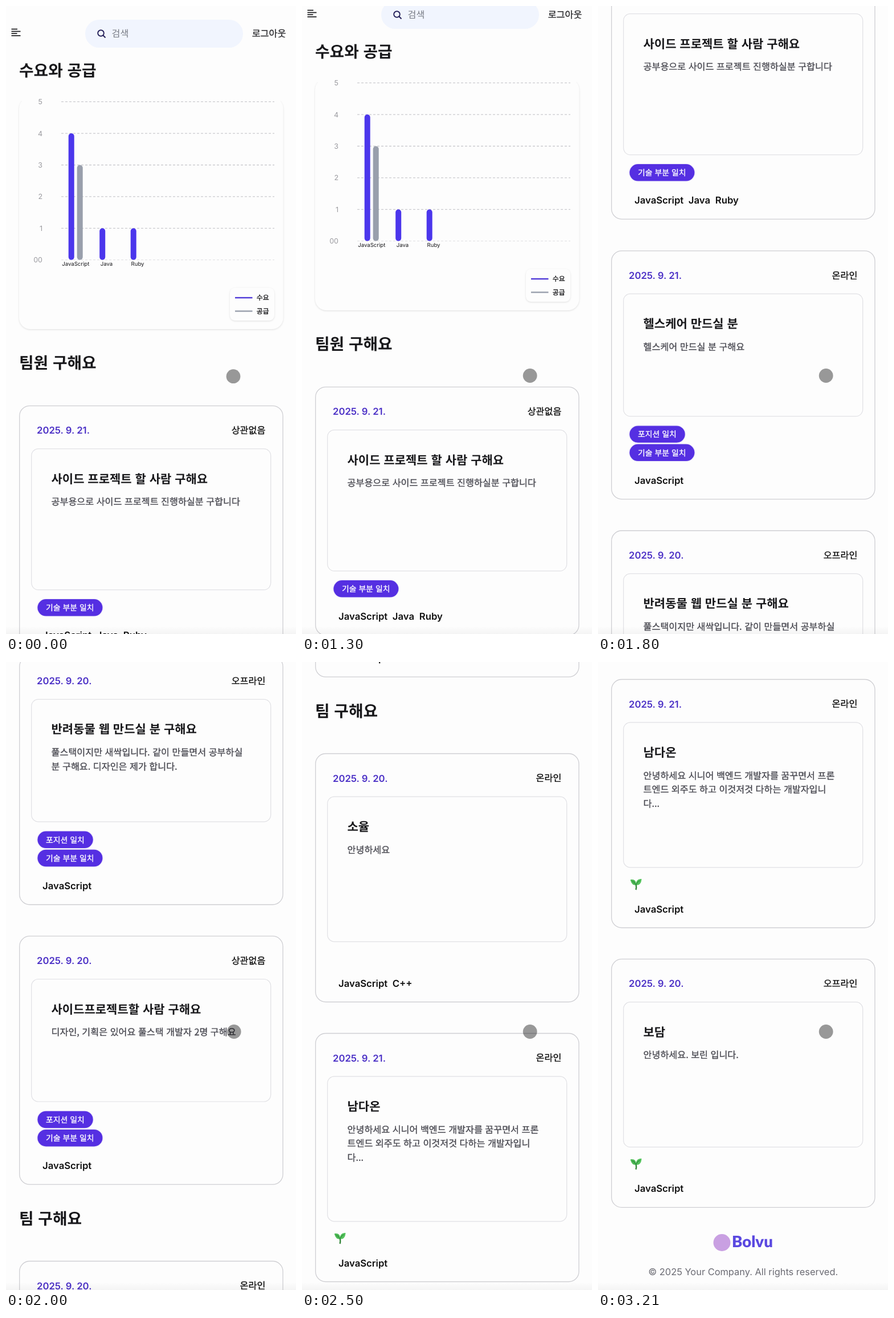
An HTML page that plays this animation: 509x1100 px, repeating every 3320 ms.

```html
<!DOCTYPE html>
<html lang="ko">
<head>
<meta charset="utf-8">
<style>
  html, body { margin: 0; width: 100%; height: 100%; overflow: hidden; background: #fdfdfd; }
  svg { display: block; width: 100%; height: 100%; }
  text { font-family: Inter, "Noto Sans CJK KR", "Noto Sans CJK", sans-serif; text-rendering: geometricPrecision; }
  .ko { font-family: "Noto Sans CJK KR", "Noto Sans CJK", sans-serif; }
  .medium { stroke: currentColor; stroke-width: .32px; }
  .logo { font-family: Lato, sans-serif; }
  .shadow { filter: drop-shadow(0 1.5px 1.5px rgba(0, 0, 0, .12)); }
</style>
</head>
<body>
<svg viewBox="0 0 509 1100">
  <defs>
    <linearGradient id="fade" x2="0" y2="1">
      <stop stop-color="#000" stop-opacity="0"/>
      <stop offset="1" stop-color="#000" stop-opacity=".035"/>
    </linearGradient>
  </defs>
  <g id="page"></g>
  <rect y="1086" width="509" height="14" fill="url(#fade)"/>
  <circle id="pointer" r="12.4" fill="#000" fill-opacity=".4"/>
</svg>
<script>
const LOOP = 3320;
const INK = '#18181b', BLUE = '#4b36ec', GRAY = '#999fac';
const BODY = 16.22, LATIN = 16.7;
const page = document.getElementById('page');
const pointer = document.getElementById('pointer');

const rect = (x, y, w, h, r, attrs) =>
  `<rect x="${x}" y="${y}" width="${w}" height="${h}" rx="${r}" ${attrs}/>`;
const line = (x1, x2, y, attrs) => `<path d="M${x1} ${y}H${x2}" fill="none" ${attrs}/>`;

// Text placed by its vertical centre; Hangul strings get the Korean face.
function text(x, cy, size, weight, fill, str, anchor = 'start', extra = '') {
  const ko = /[가-힣]/.test(str);
  const cls = `${ko ? 'ko' : ''} ${ko && weight === 500 ? 'medium' : ''} ${extra}`;
  return `<text x="${x}" y="${cy + size * (ko ? .375 : .363)}" font-size="${size}" font-weight="${weight}"
    fill="${fill}" color="${fill}" text-anchor="${anchor}" class="${cls}">${str}</text>`;
}
const heading = (cy, str) => text(23, cy, 27.8, 700, INK, str);

function header() {
  return [[20, 40.5], [25.5, 44.5], [19.5, 48.2], [25.5, 52]]
      .map(([end, y]) => line(9.5, end, y, `stroke="${INK}" stroke-width="1.7"`)).join('') +
    rect(139, 24, 277, 49, 24.5, 'fill="#f1f5fe"') +
    `<path d="M170.5 51.5L174.5 55.5" stroke="#25215a" stroke-width="1.9"/>
     <circle cx="166.5" cy="47.5" r="5.3" fill="none" stroke="#25215a" stroke-width="1.9"/>` +
    text(185.5, 48, BODY, 400, '#777b84', '검색') +
    text(491.3, 48, BODY, 500, '#27272a', '로그아웃', 'end');
}

function chart() {
  const base = 444.7, unit = 55.4;
  let out = rect(23, 160, 463.5, 406, 20, 'fill="#fdfdfd" class="shadow"') +
    rect(15, 150, 480, 16, 0, 'fill="#fdfdfd"');
  for (let v = 0; v <= 5; v++) {
    const y = base - v * unit;
    out += line(97, 471, y, `stroke="${v ? '#cbcbcf' : '#e4e4e6'}" stroke-width="1.3" stroke-dasharray="4 3"`) +
      text(64, y, 12.5, 400, '#9a9a9f', v || '00', 'end');
  }
  const bar = (x, v, fill) => rect(x, base - v * unit, 10, v * unit, 5, `fill="${fill}"`);
  out += bar(109.7, 4, BLUE) + bar(124.7, 3, GRAY) + bar(164.2, 1, BLUE) + bar(218.7, 1, BLUE);
  [['JavaScript', 122.3], ['Java', 176.5], ['Ruby', 231]].forEach(([name, x]) =>
    out += text(x, 452, 9.6, 400, INK, name, 'middle'));
  out += rect(393, 493.5, 78, 57.5, 9, 'fill="#fdfdfd" class="shadow"');
  [['수요', 511, '#4f39d8'], ['공급', 534.5, GRAY]].forEach(([name, y, color]) =>
    out += line(402, 432.5, y, `stroke="${color}" stroke-width="2.4"`) +
      text(439.7, y, 11.9, 500, INK, name));
  return out;
}

const sprout = (x, y) => `<g transform="translate(${x} ${y})">
  <path d="M0 10.5C1.5 6 .5 3 0 0" fill="none" stroke="#35863b" stroke-width="2.4"/>
  <path d="M.3 2C-5 3.500-8-1-9.700-7C-4-8.500 1-6 .3 2Z" fill="#4dbb55"/>
  <path d="M.3 2C-.5-5 4-9 10-8.500C9.500-1 6 3.500 .3 2Z" fill="#54c45c"/>
  <path d="M-6.500-4.500Q-2-3 .3 2Q2-3 7-5.500" fill="none" stroke="#2f8a3c" stroke-width="1.2"/>
</g>`;

function badge(y, str) {
  const width = str.length > 6 ? 114 : 97.3;
  return rect(55.4, y + .3, width, 29.4, 14.7,
      'fill="#552fe2" stroke="#e0dbf8" stroke-width="1.6" paint-order="stroke"') +
    text(70, y + 15, 13.9, 500, '#fff', str);
}

function card({ y, date, place, boxHeight, title, lines, badges = [], plant, tags }) {
  const tagX = [64, 158.8, 205.8];
  return rect(23.7, y, 462.3, 435, 18, 'fill="none" stroke="#cfcfd3" stroke-width="1.3"') +
    text(54, y + 43, LATIN, 600, '#4b30c6', date) +
    text(455.3, y + 42.7, BODY, 500, '#111', place, 'end') +
    rect(44.7, y + 75.3, 420, boxHeight, 12, 'fill="none" stroke="#e1e1e5" stroke-width="1.2"') +
    text(79.5, y + 127.5, 21, 700, INK, title) +
    lines.map((str, i) => text(79.6, y + 168 + i * 24.8, BODY, 500, '#484850', str)).join('') +
    badges.map((str, i) => badge(y + 338.5 - 32.2 * (badges.length - 1 - i), str)).join('') +
    (plant ? sprout(66.5, y + 358) : '') +
    tags.map((str, i) => text(tagX[i], y + 402, LATIN, 600, '#111', str)).join('');
}

const both = ['포지션 일치', '기술 부분 일치'], js = ['JavaScript'];
const cards = [
  { y: 700.3, date: '2025. 9. 21.', place: '상관없음', boxHeight: 247, title: '사이드 프로젝트 할 사람 구해요',
    lines: ['공부용으로 사이드 프로젝트 진행하실분 구합니다'], badges: ['기술 부분 일치'],
    tags: ['JavaScript', 'Java', 'Ruby'] },
  { y: 1190.8, date: '2025. 9. 21.', place: '온라인', boxHeight: 214.5, title: '헬스케어 만드실 분',
    lines: ['헬스케어 만드실 분 구해요'], badges: both, tags: js },
  { y: 1681, date: '2025. 9. 20.', place: '오프라인', boxHeight: 214.5, title: '반려동물 웹 만드실 분 구해요',
    lines: ['풀스택이지만 새싹입니다. 같이 만들면서 공부하실', '분 구해요. 디자인은 제가 합니다.'],
    badges: both, tags: js },
  { y: 2171.2, date: '2025. 9. 20.', place: '상관없음', boxHeight: 214.5, title: '사이드프로젝트할 사람 구해요',
    lines: ['디자인, 기획은 있어요 풀스택 개발자 2명 구해요'], badges: both, tags: js },
  { y: 2740.5, date: '2025. 9. 20.', place: '온라인', boxHeight: 254, title: '소율',
    lines: ['안녕하세요'], tags: ['JavaScript', 'C++'] },
  { y: 3230.5, date: '2025. 9. 21.', place: '온라인', boxHeight: 254, title: '남다온',
    lines: ['안녕하세요 시니어 백엔드 개발자를 꿈꾸면서 프론', '트엔드 외주도 하고 이것저것 다하는 개발자입니', '다...'],
    plant: true, tags: js },
  { y: 3720.4, date: '2025. 9. 20.', place: '오프라인', boxHeight: 254, title: '보담',
    lines: ['안녕하세요. 보린 입니다.'], plant: true, tags: js }
];

const footer = () =>
  '<circle cx="217.500" cy="4217" r="15" fill="#c9a0e2"/>' +
  text(235, 4215.5, 27.5, 900, '#5a48e0', 'Bolvu', 'start', 'logo') +
  text(254.7, 4268, 16.4, 400, '#6b6b73', '© 2025 Your Company. All rights reserved.', 'middle');

page.innerHTML = header() + heading(113, '수요와 공급') + chart() +
  heading(625, '팀원 구해요') + heading(2665.5, '팀 구해요') +
  cards.map(card).join('') + footer();

// Scroll keys: time (ms), offset (px), speed (px/ms); overshoots the end and settles back.
const keys = [
  [1200, 0, 0], [1300, 33, 1.2], [1800, 762, 2.2], [2000, 1691, 3.7],
  [2500, 2580, 1], [2900, 3092, 1.4], [3000, 3223, 0], [3210, 3200, 0]
];

function scrollAt(t) {
  if (t <= keys[0][0]) return 0;
  const i = keys.findIndex(k => t <= k[0]);
  const [t0, p0, v0] = keys[i - 1], [t1, p1, v1] = keys[i];
  const d = t1 - t0, u = (t - t0) / d, w = 1 - u;
  return w * w * (1 + 2 * u) * p0 + u * u * (3 - 2 * u) * p1 + d * u * w * (w * v0 - u * v1);
}

function draw(now) {
  const time = now % LOOP;
  const t = time >= 3210 ? 3210 : Math.min(3100, Math.floor(time / 100) * 100);
  const drift = Math.min(1, t / 300);
  page.setAttribute('transform', `translate(0 ${-scrollAt(t)})`);
  pointer.setAttribute('cx', 399 + 1.2 * drift);
  pointer.setAttribute('cy', 648.7 - 1.2 * drift);
}

const start = performance.now();
function tick() {
  draw(performance.now() - start);
  requestAnimationFrame(tick);
}
tick();
</script>
</body>
</html>
```
